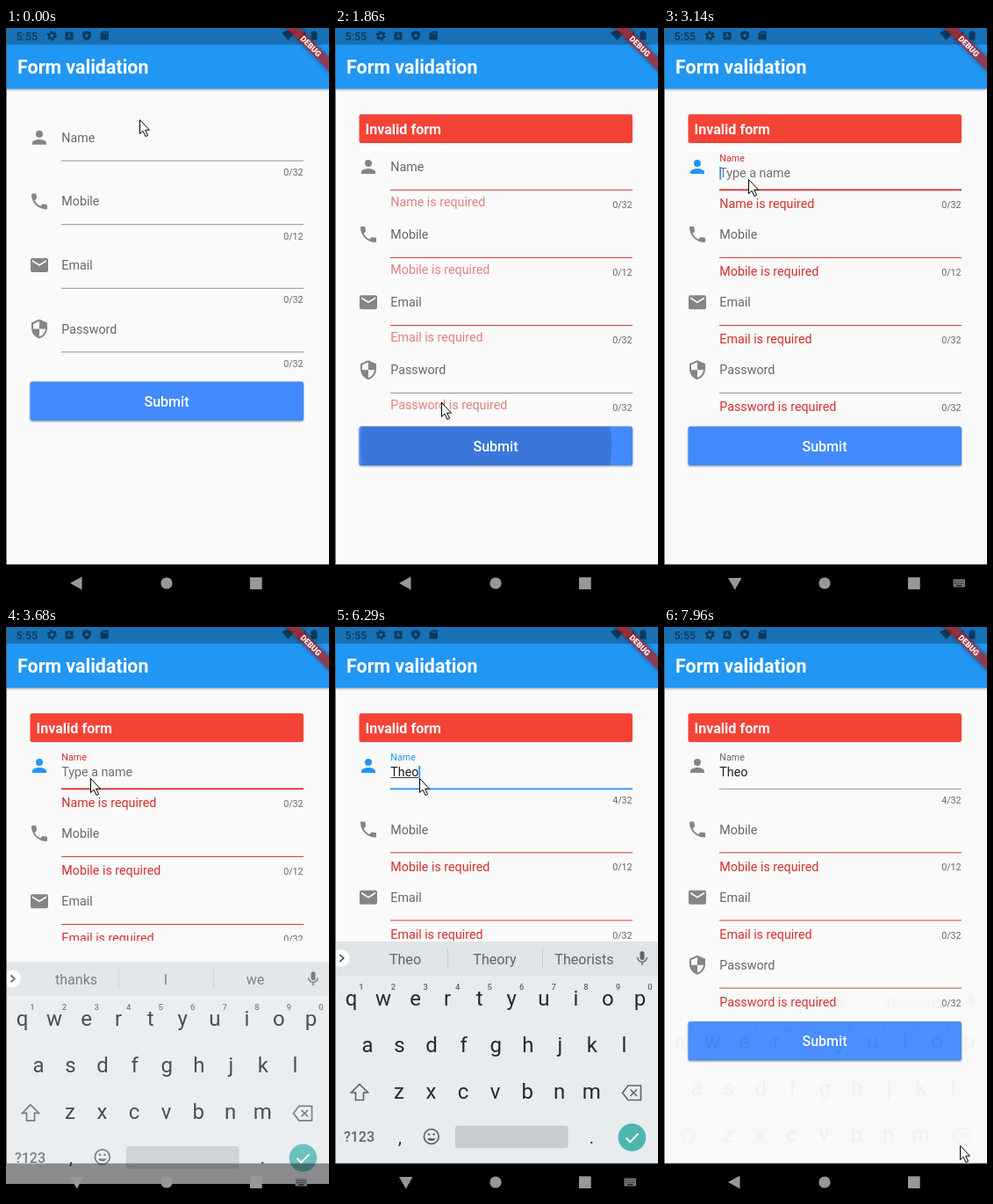
Animation of 368x650 px, one loop 8 s. Source, as an HTML page:

```html
<!DOCTYPE html>
<html lang="en">
<head>
<meta charset="utf-8">
<title>Form validation</title>
<style>
html, body { margin: 0; width: 100%; height: 100%; overflow: hidden; background: #fafafa; }
svg { display: block; width: 368px; height: 650px; font-family: Roboto, sans-serif; }
.bar { filter: drop-shadow(0 1.5px 1.5px #0005); }
.button { filter: drop-shadow(0 1.5px 1px #0006); }
.ribbon { filter: drop-shadow(0 0 2.5px #0008); }
</style>
</head>
<body>
<svg id="stage" viewBox="0 0 368 650"></svg>
<script>
const LOOP = 8000;
const RED = '#d32f2f', BLUE = '#2196f3', GREY = '#676767', ICON = '#858585';

// The picture holds between these moments.
const TICKS = [0, 880, 1000, 1150, 1300, 1860, 1980, 2110, 2230, 2350, 2500, 2620, 2990, 3140, 3400, 3680,
  3800, 4390, 4800, 5260, 5680, 5800, 5920, 6040, 6290, 6850, 7130, 7250, 7400, 7520, 7680, 7810, 7960];
const POINTER = [[0, 152, 104], [880, 118, 190], [1000, 84, 279], [1150, 107, 402], [1300, 121, 426],
  [2110, 118, 390], [2230, 103, 270], [2350, 95, 189], [2500, 95, 181], [2620, 96, 172],
  [7130, 190, 360], [7250, 299, 579], [7400, 330, 597], [7520, 336, 604], [7810, 342, 598], [7960, 337, 590]];
const TYPING = [[0, '', 'thanks', 'I', 'we'], [5680, 'T', 'T', 'The', 'To'], [5920, 'Th', 'Th', 'The', 'This'],
  [6040, 'The', 'The', 'Then', 'They'], [6290, 'Theo', 'Theo', 'Theory', 'Theorists']];
const CARET = [[2990, 3400], [3800, 4390], [4800, 5260], [5680, 6850], [7130, 7680]];

const FIELDS = [
  ['Name', 32, 'M12 12a4 4 0 1 0 0-8 4 4 0 0 0 0 8zm0 2c-2.67 0-8 1.34-8 4v2h16v-2c0-2.66-5.33-4-8-4z'],
  ['Mobile', 12, 'M6.6 10.8c1.45 2.8 3.75 5.1 6.6 6.6l2.2-2.2c.3-.3.7-.4 1-.25 1.1.4 2.3.55 3.6.55q1 0 1 1V20q0 1-1 1A17 17 0 0 1 3 4q0-1 1-1h3.5q1 0 1 1c0 1.25.2 2.45.6 3.6.1.35 0 .7-.3 1z'],
  ['Email', 32, 'M20 4H4a2 2 0 0 0-2 2v12a2 2 0 0 0 2 2h16a2 2 0 0 0 2-2V6a2 2 0 0 0-2-2zm0 4l-8 5-8-5V6l8 5 8-5z'],
  ['Password', 32, 'M12 1L3 5v6c0 5.55 3.84 10.74 9 12 5.16-1.26 9-6.45 9-12V5zm0 11h7c-.53 4.1-3.28 7.8-7 8.9V12H5V6.3l7-3.1z']
];

const stage = document.getElementById('stage');
const pen = document.createElement('canvas').getContext('2d');
pen.font = '14.28px Roboto, sans-serif';

const last = (list, t) => list.filter(k => k[0] <= t).pop();
const ramp = (t, a, b) => Math.min(1, Math.max(0, (t - a) / (b - a)));
const mix = (a, b, p) => a + (b - a) * p;
const rect = (x, y, w, h, fill, more = '') => `<rect x="${x}" y="${y}" width="${w}" height="${h}" fill="${fill}" ${more}/>`;
const path = (d, fill, more = '') => `<path d="${d}" fill="${fill}" ${more}/>`;
const disc = (x, y, r, fill, more = '') => `<circle cx="${x}" cy="${y}" r="${r}" fill="${fill}" ${more}/>`;
const stroke = (d, color, w) => path(d, 'none', `stroke="${color}" stroke-width="${w}"`);
// y is the middle of the capitals
const text = (x, y, s, size, fill, more = '') =>
  `<text x="${x}" y="${y + size * .355}" font-size="${size}" fill="${fill}" ${more}>${s}</text>`;
const MID = 'text-anchor="middle"', END = 'text-anchor="end"';

function field(t, i, y, state) {
  const [name, limit, icon] = FIELDS[i];
  const { typed, focus, invalid } = state;
  const first = i === 0, active = first && focus, failed = invalid(i);
  const float = first ? ramp(t, 2960, 3140) : 0;
  const accent = failed ? RED : BLUE;
  const lineColor = active ? accent : failed && !(i === 3 && t < 5680) ? RED : '#8c8c8c';
  let out = path(icon, active ? BLUE : ICON, `transform="translate(26 ${y - 12})"`);

  out += text(63.3, y - 10 * float, name, mix(14.28, 10.71, float), active && float > .5 ? accent : GREY);
  if (first && typed) {
    const w = pen.measureText(typed).width;
    out += text(63.3, y + 7, typed, 14.28, '#212121');
    if (focus) out += rect(63.3, y + 13, w, .9, '#212121');
  } else if (float) {
    out += text(63.3, y + 7, 'Type a name', 14.28, '#707070', `opacity="${float}"`);
  }
  if (first && CARET.some(([a, b]) => t >= a && t < b)) {
    const x = typed ? 63.3 + pen.measureText(typed).width : 63.3;
    out += rect(x, y, 1.8, 14.5, BLUE);
  }
  const thick = active ? 1.8 : .95;
  out += rect(63, y + 26.3 - thick / 2, 276, thick, lineColor);

  // The message drops in while fading; the first one fades out again on typing.
  const shown = mix(.6, 1, ramp(t, 1860, 1960));
  const opacity = failed ? shown : first && t >= 5680 ? .4 * (1 - ramp(t, 5680, 5790)) : 0;
  if (t >= 1860 && opacity)
    out += text(63.3, y + 42 - (1 - shown) * 5, name + ' is required', 14.28, RED, `opacity="${opacity}"`);
  out += text(338.6, y + (failed ? 43 : 39.6), `${first ? typed.length : 0}/${limit}`, 10.71, GREY, END);
  return out;
}

function form(t, state) {
  const banner = t >= 1860;
  let y = banner ? 158 : 124.8, out = '';
  if (banner)
    out += rect(27.5, 98.3, 311.5, 32.7, '#f44336', 'rx="2.5"') + text(34.5, 115, 'Invalid form', 16.07, '#fff', 'font-weight="700"');
  for (let i = 0; i < 4; i++) {
    out += field(t, i, y, state);
    y += state.invalid(i) ? 77.1 : 72.6;
  }
  const top = y - 12.8;
  out += rect(27.5, top, 311.5, 44.5, '#448aff', 'rx="2.7" class="button"');
  if (t >= 1860 && t < 2350) {
    const age = t - 1860;
    out += `<clipPath id="face">${rect(27.5, top, 311.5, 44.5, '#000', 'rx="2.7"')}</clipPath>`
      + disc(172.3, top + 22, 143 + age * .25, '#000', `opacity="${.14 * (1 - age / 490)}" clip-path="url(#face)"`);
  }
  return out + text(183, top + 22.5, 'Submit', 16.07, '#fff', MID + ' font-weight="500"');
}

function keyboard(words) {
  const ink = '#1c2d33', soft = '#5a676d';
  let out = rect(1, 358, 367, 253, '#e8ecef') + rect(1, 358, 367, 38.5, '#e0e4e6');
  out += `<clipPath id="edge">${rect(1, 358, 30, 40, '#000')}</clipPath>` + disc(7, 377, 10, '#fff', 'clip-path="url(#edge)"')
    + stroke('M5.5 373l4.2 4-4.2 4', '#37474f', 1.7);
  words.forEach((w, i) => out += text(80 + 102 * i, 378, w, 16.07, soft, MID));
  out += rect(128, 366, 1, 22, '#c5cacd') + rect(236, 366, 1, 22, '#c5cacd');
  out += rect(347.5, 369, 5, 10, soft, 'rx="2.5"') + stroke('M344.7 376a5.3 5.3 0 0 0 10.6 0M350 381v4', soft, 1.5);

  const row = (keys, x, y) => [...keys].forEach((k, i) =>
    out += `<text x="${x + 36.55 * i}" y="${y}" font-size="24" fill="${ink}" ${MID}>${k}</text>`);
  row('qwertyuiop', 18.5, 431);
  row('asdfghjkl', 37, 483.5);
  row('zxcvbnm', 73, 537);
  [...'1234567890'].forEach((d, i) => out += text(30 + 36.55 * i, 409.7, d, 9.5, soft, MID + ' font-weight="500"'));

  out += stroke('M28 520.5l9.5 9.5h-5v8.5h-9v-8.5h-5z', soft, 1.7);
  out += stroke('M334 522h14.5v16.500h-14.500l-6.500-8.250zM336.500 526.500l7.500 7.500m0-7.500l-7.500 7.500', soft, 1.7);
  out += text(27.5, 580.5, '?123', 16.07, soft, MID + ' font-weight="500"');
  out += `<text x="74" y="588" font-size="20" fill="${ink}" ${MID}>,</text><text x="292.500" y="588" font-size="20" fill="${ink}" ${MID}>.</text>`;
  out += disc(109.8, 580, 8.4, 'none', `stroke="${soft}" stroke-width="1.7"`) + disc(107, 577.5, 1.3, soft) + disc(112.6, 577.5, 1.3, soft)
    + path('M105 582h9.600a5 4 0 0 1-9.600 0z', soft);
  out += rect(137, 567.8, 128.5, 25.4, '#c8ccd0', 'rx="3"');
  return out + disc(338.4, 581, 15.8, '#4db6ac') + stroke('M331.500 581.500l4.800 4.800 9.200-9.500', '#fff', 2);
}

function header() {
  const dark = '#0b3a5e', bar = '#1971b5';
  let out = rect(0, 0, 368, 69.3, BLUE, 'class="bar"') + rect(0, 0, 368, 19, bar);
  out += text(13, 44.8, 'Form validation', 21.43, '#fff', 'font-weight="700"');
  out += text(11.5, 9.2, '5:55', 12.5, dark, 'font-weight="500"');
  out += disc(52.3, 8.8, 3.2, 'none', `stroke="${dark}" stroke-width="2.2"`)
    + disc(52.3, 8.8, 4.8, 'none', `stroke="${dark}" stroke-width="1.7" stroke-dasharray="2.5 2.527"`);
  out += rect(67.5, 4.5, 9, 9, dark, 'rx="1"') + text(72, 9, 'A', 7, bar, MID + ' font-weight="700"');
  out += path('M92 3l5 2v3.500q-.5 4-5 5.800-4.500-1.800-5-5.800V5z', dark) + disc(92, 8.5, 1.8, bar);
  out += path('M110.500 3.500h5.500q.8 0 .8.8v8.400q0 .8-.8.8h-7.700q-.8 0-.8-.8V6.500z', dark) + stroke('M110.800 5v2m1.800-2v2m1.800-2v2', bar, .8);
  out += path('M314 5.500q7.500-5.500 15 0l-7.500 8.500z', dark) + path('M331 13.500h10v-10z', dark)
    + path('M347.500 4.500h2v-1.300h3v1.300h2v9h-7z', dark);
  return out + `<g transform="translate(347.300 20.700) rotate(45)">${rect(-40, -5.4, 80, 10.8, '#b71c1c', 'opacity=".75" class="ribbon"')}${
    text(0, 0, 'DEBUG', 9.1, '#fff', MID + ' font-weight="900"')}</g>`;
}

function navBar(open, sliding) {
  const c = '#989898';
  let out = sliding ? rect(0, 610.6, 368, 23.4, '#000', 'opacity=".42"') + rect(0, 634, 368, 16, '#000') : rect(0, 610.6, 368, 40, '#000');
  out += open ? path('M73 626h15.500l-7.750 13.500z', c) : path('M73 632l13.500-7.500v15z', c);
  out += disc(183, 632, 6.6, c) + rect(278, 625.3, 13.7, 13.7, c);
  if (open) {
    out += rect(329.5, 627.5, 13.5, 9, '#777', 'rx="1"');
    for (const y of [630, 632.5]) out += stroke(`M331 ${y}h11`, '#000', 1).replace('/>', ' stroke-dasharray="1 1.300"/>');
    out += rect(333, 634.3, 6.5, 1, '#000');
  }
  return out;
}

function scene(t) {
  const [, typed, ...words] = last(TYPING, t);
  const focus = t >= 2990 && t < 7680;
  const state = { typed, focus, invalid: i => t >= 1860 && (i > 0 || !typed) };
  const squeezed = t >= 3400 && t < 7960;
  const rising = t === 3680, leaving = t >= 7960;

  let out = rect(0, 0, 368, 650, '#fafafa');
  out += `<clipPath id="view">${rect(0, 69, 368, squeezed ? 288.3 : 542, '#000')}</clipPath><g clip-path="url(#view)">${form(t, state)}</g>`;
  if (t >= 3680) {
    const dy = rising ? 23.3 : leaving ? 49 : 0;
    out += `<g transform="translate(0 ${dy})" opacity="${rising ? .82 : leaving ? .04 : 1}">${keyboard(words)}</g>`;
  }
  out += header() + navBar(focus, rising) + rect(0, 0, 1, 611, '#555', 'opacity=".8"');
  const [, x, y] = last(POINTER, t);
  return out + path('M.5.5V16.500L4 13.200l3 6.300 2.600-1.200-2.900-6.100h4.800z', '#fff',
    `stroke="#000" stroke-width="1" transform="translate(${x} ${y})"`);
}

let shown = -1;
function draw() {
  const now = performance.now() % LOOP;
  const t = TICKS.filter(k => k <= now).pop();
  if (t !== shown) stage.innerHTML = scene(shown = t);
  requestAnimationFrame(draw);
}
draw();
</script>
</body>
</html>
```
